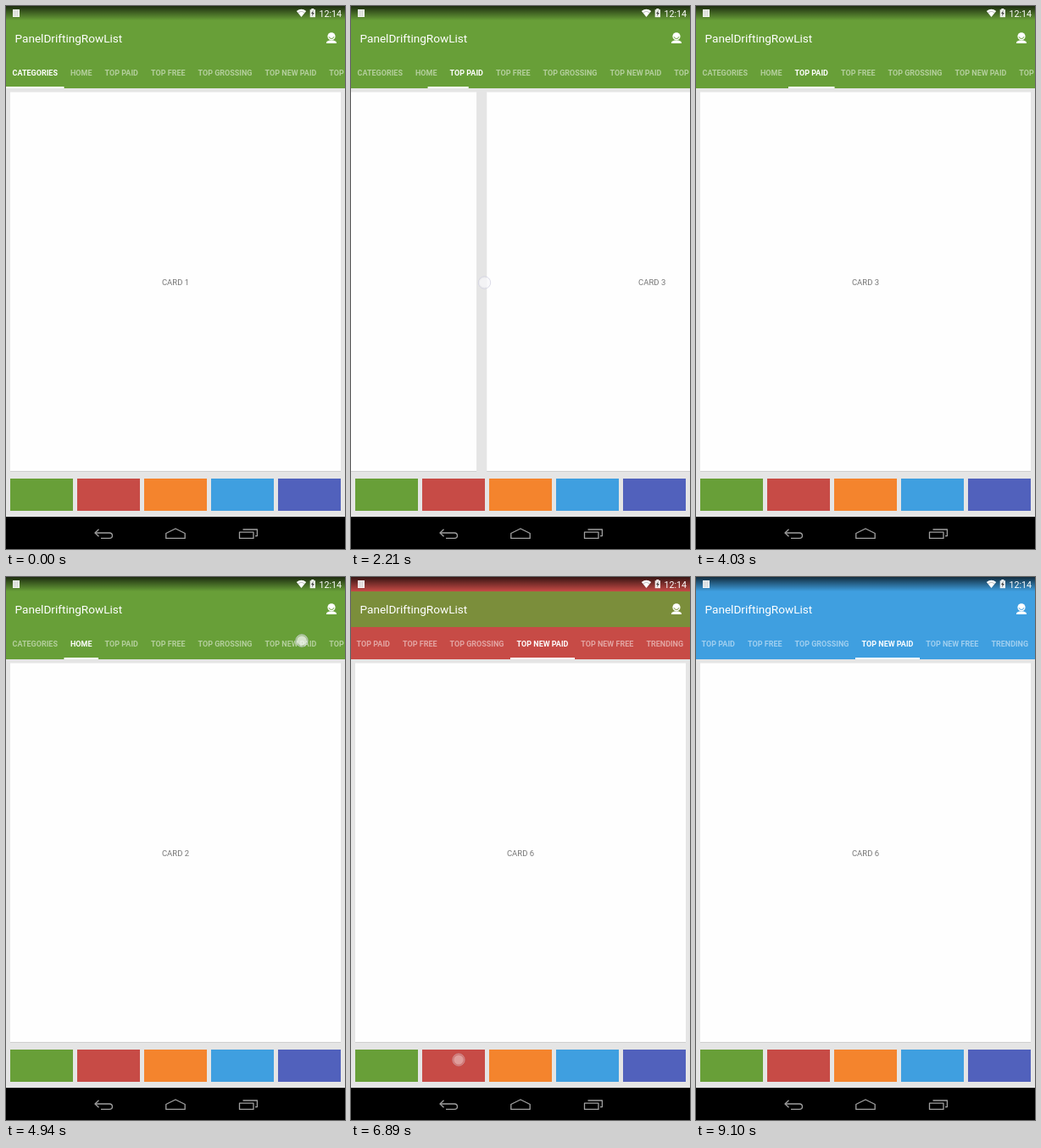
These frames come from a looping animation (400 by 640 pixels, 9880 ms). An HTML page with a canvas:

```html
<!DOCTYPE html>
<html lang="en">
<head>
<meta charset="utf-8">
<title>Sliding tabs</title>
<style>
html, body { margin: 0; width: 100%; height: 100%; overflow: hidden; background: #000; }
canvas { display: block; width: 400px; height: 640px; }
</style>
</head>
<body>
<canvas id="stage"></canvas>
<script>
const W = 400, H = 640, LOOP = 9880, STEP = 130, PAGE = 402;
const canvas = document.getElementById('stage');
const ctx = canvas.getContext('2d');
const dpr = window.devicePixelRatio || 1;
canvas.width = W * dpr;
canvas.height = H * dpr;

const GREEN = [104, 159, 56], RED = [199, 75, 70], ORANGE = [244, 132, 45],
      BLUE = [63, 159, 224], INDIGO = [81, 97, 188];
const SWATCHES = [GREEN, RED, ORANGE, BLUE, INDIGO];
const TABS = ['CATEGORIES', 'HOME', 'TOP PAID', 'TOP FREE', 'TOP GROSSING',
              'TOP NEW PAID', 'TOP NEW FREE', 'TRENDING'];
const EDGES = [0, 68.5, 109, 163.5, 219, 298, 374, 450.5, 510];

// Each swipe runs over five steps
const SWIPES = [[1300, 0, 1], [1950, 1, 2], [2600, 2, 3], [3510, 3, 2], [4160, 2, 1]];
const DRAG = [0, 0.2, 0.614, 0.93, 1];
const LINE = [0, 0.12, 0.545, 0.9, 1];
const FINGER = [0, 0.42, 1, 1, 1];
const FADE = [1, 1, 1, 0.4, 0];

const TAPS = [
  { x: 349, y: 75, down: 4940, fade: 5460, up: 5720 },
  { x: 127, y: 569, down: 6630, fade: 6890, up: 7150 },
  { x: 205, y: 575, down: 7280, fade: 7800, up: 8060 },
  { x: 285, y: 577.5, down: 8190, fade: 8710, up: 8970 }
];
const RECOLORS = [[6890, RED], [7670, ORANGE], [8580, BLUE]];
const JUMP = { start: 5300, length: 600, from: 1, to: 5 };

const lerp = (a, b, k) => a + (b - a) * k;
const clamp = (v, lo, hi) => Math.max(lo, Math.min(hi, v));
const rgb = c => `rgb(${c.map(Math.round).join(',')})`;
const white = a => `rgba(255,255,255,${a})`;

function rect(x, y, w, h, fill) {
  ctx.fillStyle = fill;
  ctx.fillRect(x, y, w, h);
}

function text(str, x, y, font, fill, align = 'left') {
  ctx.font = `${font} Roboto, sans-serif`;
  ctx.fillStyle = fill;
  ctx.textAlign = align;
  ctx.fillText(str, x, y);
}

function shape(points, close = true) {
  ctx.beginPath();
  points.forEach(([x, y]) => ctx.lineTo(x, y));
  if (close) ctx.closePath();
}

function circle(x, y, r) {
  ctx.beginPath();
  ctx.arc(x, y, r, 0, Math.PI * 2);
}

function pagerAt(t) {
  const state = { page: 0, line: 0, selected: 0, touch: null };
  for (const [start, from, to] of SWIPES) {
    if (t < start) break;
    const i = Math.min(4, Math.floor((t - start) / STEP));
    state.page = lerp(from, to, DRAG[i]);
    state.line = lerp(from, to, LINE[i]);
    state.selected = i < 2 ? from : to;
    const [x0, x1] = to > from ? [340, 157.5] : [70, 245];
    state.touch = { x: lerp(x0, x1, FINGER[i]), y: 326, alpha: FADE[i] };
  }
  if (t >= JUMP.start) {
    const k = clamp((t - JUMP.start) / JUMP.length, 0, 1);
    state.page = state.line = lerp(JUMP.from, JUMP.to, 1 - (1 - k) ** 5);
    state.selected = JUMP.to;
  }
  const tap = TAPS.find(p => t >= p.down && t < p.up);
  if (tap) state.touch = { x: tap.x, y: tap.y, alpha: t < tap.fade ? 1 : 0.55 };
  return state;
}

// The tab strip recolours at once, the title bar fades
function colorsAt(t) {
  let strip = GREEN, bar = GREEN;
  for (const [start, color] of RECOLORS) {
    if (t < start) break;
    const k = clamp((t - start + 40) / 200, 0, 1);
    bar = strip.map((v, i) => lerp(v, color[i], k));
    strip = color;
  }
  return { strip: rgb(strip), bar: rgb(bar) };
}

function drawPages(page) {
  rect(0, 97, W, 505, '#e5e5e5');
  for (let i = 0; i < TABS.length; i++) {
    const x = (i - page) * PAGE;
    if (Math.abs(x) >= PAGE) continue;
    rect(x + 5, 102, 390, 447, '#cfcfcf');
    rect(x + 5, 101.5, 390, 446.5, '#fefefe');
    text('CARD ' + (i + 1), x + 200, 328.5, '9.5px', '#757575', 'center');
  }
}

function drawTabs(state, strip) {
  rect(0, 59, W, 38, strip);
  const i = Math.floor(state.line), k = state.line - i;
  const edge = n => lerp(EDGES[n], EDGES[Math.min(n + 1, TABS.length)], k);
  const left = edge(i), right = edge(i + 1);
  const scroll = clamp((left + right) / 2 - W / 2, 0, 110);
  TABS.forEach((label, n) => {
    const x = (EDGES[n] + EDGES[n + 1]) / 2 - scroll;
    text(label, x, 81.7, 'bold 9px', white(n === state.selected ? 1 : 0.5), 'center');
  });
  rect(left - scroll, 95, right - left, 2, '#fff');
}

function drawPerson(bar) {
  ctx.fillStyle = '#fff';
  circle(384, 35.8, 4.6);
  ctx.fill();
  shape([[377.8, 44], [378.6, 41.8], [381.5, 40.5], [386.5, 40.5], [389.4, 41.8], [390.2, 44]]);
  ctx.fill();
  ctx.strokeStyle = bar;
  ctx.lineWidth = 1;
  ctx.beginPath();
  ctx.arc(384, 35.5, 3, 0.25, Math.PI - 0.25);
  ctx.stroke();
}

function drawStatus(strip) {
  rect(0, 0, W, 17, strip);
  const shade = ctx.createLinearGradient(0, 0, 0, 17);
  shade.addColorStop(0, 'rgba(0,0,0,0.72)');
  shade.addColorStop(1, 'rgba(0,0,0,0)');
  rect(0, 0, W, 17, shade);

  rect(8, 4, 8, 9, white(0.92));
  for (let i = 0; i < 3; i++) rect(9.5 + i * 2, 5, 0.6, 7, 'rgba(90,90,90,0.35)');

  ctx.fillStyle = '#fff';
  ctx.beginPath();
  ctx.moveTo(348.5, 13);
  ctx.lineTo(342.8, 6);
  ctx.quadraticCurveTo(348.5, 1.6, 354.2, 6);
  ctx.fill();
  ctx.strokeStyle = 'rgba(60,60,60,0.45)';
  ctx.lineWidth = 0.7;
  ctx.beginPath();
  ctx.arc(348.5, 13, 6.3, Math.PI * 1.28, Math.PI * 1.72);
  ctx.stroke();

  rect(360.3, 3, 3, 1.5, white(0.95));
  rect(358.7, 4.2, 6.3, 9, white(0.9));
  ctx.fillStyle = '#444';
  shape([[362.6, 5.2], [360, 9], [361.6, 9], [361, 12], [363.8, 8], [362.1, 8]]);
  ctx.fill();

  text('12:14', 396, 12.7, '10.7px', '#fff', 'right');
}

function drawNav() {
  rect(0, 602, W, 38, '#000');
  ctx.strokeStyle = '#a0a0a0';
  ctx.lineWidth = 1.3;
  ctx.lineJoin = 'round';

  shape([[109.5, 616.8], [105, 621], [109.5, 625.2]], false);
  ctx.stroke();
  ctx.beginPath();
  ctx.moveTo(105, 621);
  ctx.lineTo(122, 621);
  ctx.bezierCurveTo(126.6, 621, 126.6, 627.3, 122, 627.3);
  ctx.lineTo(112, 627.3);
  ctx.stroke();

  shape([[188.8, 621.5], [200, 616], [211.2, 621.5], [211.2, 627.4], [188.8, 627.4]]);
  ctx.stroke();

  ctx.strokeRect(275.5, 620.2, 16.5, 7.2);
  shape([[279.5, 617], [296.4, 617], [296.4, 624.6], [294, 624.6]], false);
  ctx.stroke();
}

function drawTouch({ x, y, alpha }) {
  if (!alpha) return;
  ctx.globalAlpha = alpha;
  circle(x, y, 7.2);
  ctx.fillStyle = 'rgba(245,245,250,0.42)';
  ctx.fill();
  ctx.strokeStyle = 'rgba(205,205,222,0.7)';
  ctx.lineWidth = 1;
  ctx.stroke();
  circle(x, y, 5.6);
  ctx.fillStyle = 'rgba(248,248,250,0.6)';
  ctx.fill();
  ctx.globalAlpha = 1;
}

function draw(now) {
  const t = Math.floor((now % LOOP) / STEP) * STEP;
  const state = pagerAt(t), { strip, bar } = colorsAt(t);
  ctx.setTransform(dpr, 0, 0, dpr, 0, 0);
  drawPages(state.page);
  SWATCHES.forEach((c, i) => rect(5 + i * 79, 557, 74, 38, rgb(c)));
  drawStatus(strip);
  rect(0, 17, W, 42, bar);
  text('PanelDriftingRowList', 10.5, 43, '13.6px', '#fff');
  drawPerson(bar);
  drawTabs(state, strip);
  drawNav();
  if (state.touch) drawTouch(state.touch);
}

const begin = performance.now();
function tick() {
  draw(performance.now() - begin);
  requestAnimationFrame(tick);
}
tick();
</script>
</body>
</html>
```
